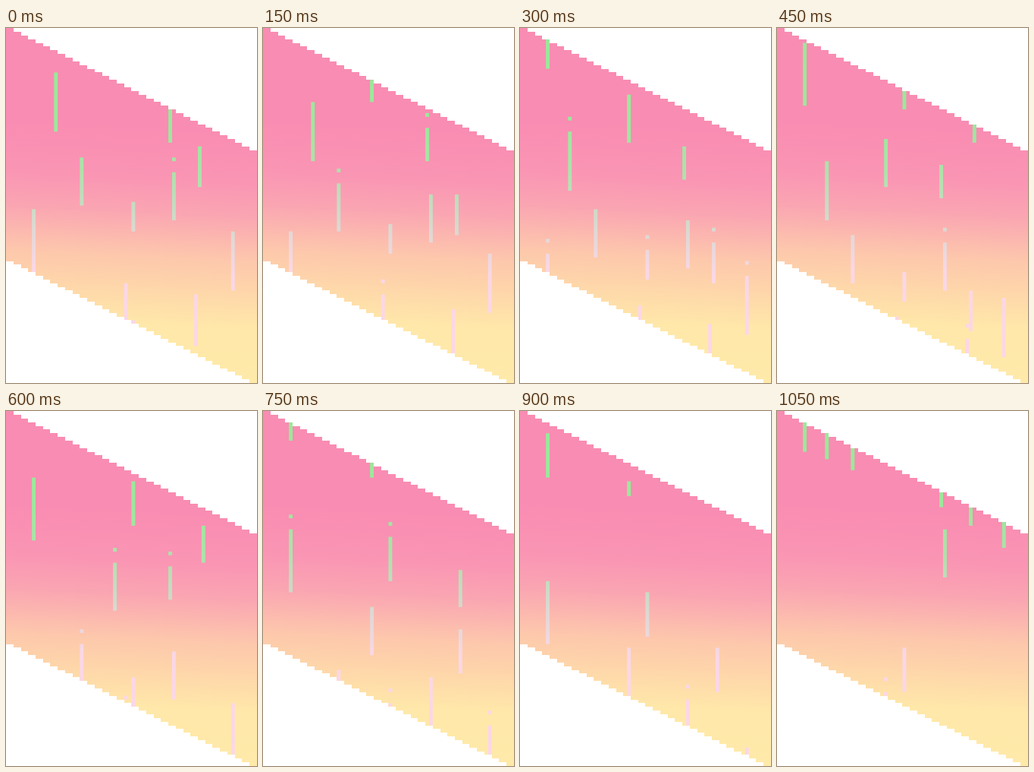
Animation, 331 px wide and 467 px high, one loop 1200 ms. Source, as an HTML page with a canvas:

```html
<!DOCTYPE html>
<html lang="en">
<head>
<meta charset="utf-8">
<title>Pixel rain</title>
<style>
  html, body { margin: 0; width: 100%; height: 100%; overflow: hidden; background: #fff; }
  canvas { display: block; width: 100%; height: 100%; }
</style>
</head>
<body>
<canvas id="stage" width="331" height="467"></canvas>
<script>
const WIDTH = 331, HEIGHT = 467, COLS = 68, ROWS = 96;
const CELL = HEIGHT / ROWS, OFFSET = 0.08;
const STEP_MS = 150, STEPS = 8, BAND_ROWS = 63;
const PEEK = 0.45, CRUMB_GAP = 4;
const ctx = document.getElementById('stage').getContext('2d');
const drops = [];

// A drop starts at a row on a given step and falls steadily, in rows per step.
function fall(col, start, row, length, speed, life = Infinity) {
  drops.push({ col, start, row, length, speed, life });
}

// Part of the drop shows at the top edge for one step before it falls.
function release(col, start, row, length, speed, life) {
  fall(col, (start + STEPS - 1) % STEPS, Math.floor(col / 2), length * PEEK, 0, 1);
  fall(col, start, row, length, speed, life);
}

release(13, 0, 12, 16, 8, 4);
release(20, 0, 35, 13, 7);
release(44, 0, 22, 9, 5, 5);
release(52, 0, 32, 11, 13, 4);
release(61, 0, 55, 16, 6);
release(7, 0, 49, 17, 6);
fall(34, 0, 47, 8, 6.3);
fall(32, 0, 69, 10, 3);
fall(51, 0, 72, 14, 4);
release(29, 2, 18, 13, 11.5);
release(7, 3, 4, 17, 14, 4);
release(34, 4, 19, 12, 15);
release(53, 4, 31, 10, 12, 2);
fall(53, 5, 59, 12, 5, 2);
fall(29, 5, 14, 4, 5, 2);
release(7, 6, 6, 12, 0, 1);
fall(45, 7, 32, 13, 6.6);

function tiltedGradient(...stops) {
  const gradient = ctx.createLinearGradient(177, 0, 154, HEIGHT);
  for (const [y, color] of stops) gradient.addColorStop(y / HEIGHT, color);
  return gradient;
}

const sky = tiltedGradient(
  [0, '#f98cb2'], [130, '#f98cb2'], [195, '#fa95b4'], [240, '#faa5b2'],
  [300, '#fdc8ac'], [340, '#fed6aa'], [390, '#ffe8a9'], [HEIGHT, '#ffeaaa']);
const rain = tiltedGradient(
  [0, '#98ea98'], [130, '#9ce89c'], [190, '#aee2aa'], [235, '#c6dcc2'],
  [275, '#e2d8d6'], [320, '#fad7e6'], [HEIGHT, '#fcd7e9']);

const edge = cell => Math.round(cell * CELL + OFFSET);

function drawBand() {
  ctx.fillStyle = sky;
  for (let stair = 0; stair < COLS / 2; stair++) {
    const x = edge(stair * 2), y = edge(stair);
    ctx.fillRect(x, y, edge(stair * 2 + 2) - x, edge(stair + BAND_ROWS) - y);
  }
}

function drawCells(col, from, to) {
  const bandTop = Math.floor(col / 2);
  const top = Math.max(Math.round(from), bandTop);
  const bottom = Math.min(Math.round(to), bandTop + BAND_ROWS);
  if (bottom > top) {
    ctx.fillRect(col * CELL + OFFSET, top * CELL + OFFSET, CELL, (bottom - top) * CELL);
  }
}

function drawDrop({ col, start, row, length, speed, life }, step) {
  const age = (step - start + STEPS) % STEPS;
  if (age >= life) return;
  const tail = row + speed * age;
  drawCells(col, tail, tail + length);
  // Every third step a drop leaves one loose cell behind.
  if (age > 0 && (col + step) % 3 === 0) {
    drawCells(col, tail - CRUMB_GAP, tail - CRUMB_GAP + 1);
  }
}

function draw(step) {
  ctx.globalCompositeOperation = 'source-over';
  ctx.clearRect(0, 0, WIDTH, HEIGHT);
  drawBand();
  ctx.globalCompositeOperation = 'source-atop';
  ctx.fillStyle = rain;
  for (const drop of drops) drawDrop(drop, step);
}

function tick() {
  draw(Math.floor(performance.now() / STEP_MS) % STEPS);
  requestAnimationFrame(tick);
}
tick();
</script>
</body>
</html>
```
